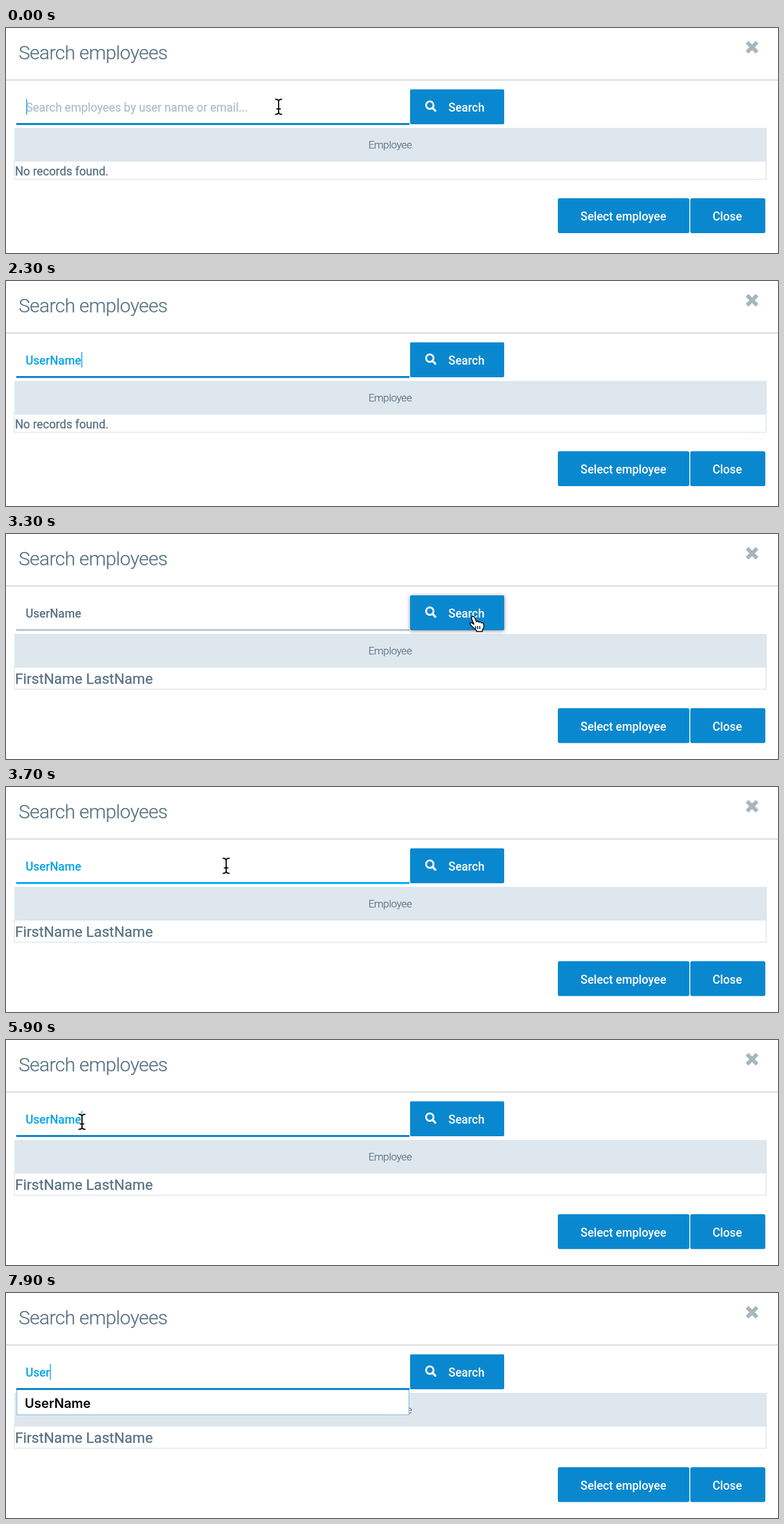
Recreate the animation shown at these times as an HTML page. Size 1280 by 374 pixels, loop 8000 ms.

```html
<!DOCTYPE html>
<html lang="en">
<head>
<meta charset="utf-8">
<title>Search employees</title>
<style>
  html, body { margin: 0; width: 100%; height: 100%; overflow: hidden; background: #fff; }
  svg { display: block; width: 1280px; height: 374px; font: 19.4px Roboto, sans-serif; }
  text { white-space: pre; }
  .thin { font-weight: 300; letter-spacing: -.02em; fill: #5a7384; stroke: #5a7384; stroke-width: .3; }
  .firm { stroke-width: .35; }
  .button { fill: #0a88cf; }
  .label { fill: #fff; font-weight: 500; font-size: 19.3px; }
  .hover { filter: drop-shadow(0 1px 3px rgba(0, 0, 0, .45)); }
</style>
</head>
<body>
<svg viewBox="0 0 1280 374">
  <text class="thin" x="21" y="52" font-size="32">Search employees</text>
  <path d="M1231 26l12 12m0-12l-12 12" stroke="#a8b5bd" stroke-width="6.4" stroke-linecap="square"/>
  <rect y="85" width="1280" height="3" fill="#e2e3e4"/>

  <rect x="14" y="166" width="1247" height="56" fill="#dfe7ee"/>
  <path d="M1260.5 166v56" stroke="#cfdce6"/>
  <text class="thin" x="601" y="200" font-size="17.4">Employee</text>
  <rect id="row" x="13.75" y="221" width="1246.5" fill="none" stroke="#dde6ed" stroke-width="1.5"/>
  <text id="result" class="firm" x="15" fill="#5a7384" stroke="#5a7384"></text>

  <g id="searchButton">
    <rect class="button" x="670" y="102" width="156" height="58" rx="2"/>
    <g fill="none" stroke="#fff" stroke-width="3">
      <circle cx="702.7" cy="128.3" r="6.2"/>
      <path d="M707.2 132.8l4.6 4.6" stroke-width="3.6" stroke-linecap="round"/>
    </g>
    <text class="label" x="733.5" y="139">Search</text>
  </g>

  <g id="footer">
    <rect class="button" x="915" y="283" width="218" height="58" rx="3"/>
    <rect class="button" x="1134.5" y="283" width="124.5" height="58" rx="3"/>
    <text class="label" x="952.5" y="320">Select employee</text>
    <text class="label" x="1171.5" y="320">Close</text>
  </g>

  <text id="hint" class="firm" x="33" y="139" fill="#b3bfc7" stroke="#b3bfc7">Search employees by user name or email...</text>
  <rect id="selection" y="118" height="26" fill="#b2d7fd"/>
  <text id="value" x="32.4" y="139" font-size="19.6" font-weight="500"></text>
  <rect id="caret" y="118" width="1.6" height="26" fill="#16a6ef"/>

  <g id="dropdown">
    <rect x="18" y="160" width="650" height="42.5" fill="#fff" stroke="#8dbdec" stroke-width="1.3"/>
    <text x="31" y="191" font-family="Inter, sans-serif" font-size="21.4" font-weight="600">UserName</text>
  </g>
  <rect id="underline" x="17" y="158" width="652" height="3.2"/>

  <g id="spinner" fill="#90b7cb"></g>

  <g id="beam" fill="none" stroke-linecap="round">
    <path id="beamShape" d="M-5 -12.5q5 0 5 4V8.5q0 4 -5 4M5 -12.5q-5 0 -5 4M0 8.5q0 4 5 4M-3 3.5h6" stroke="#fff" stroke-width="4"/>
    <use href="#beamShape"/>
    <path d="M-5 -12.5q5 0 5 4V8.5q0 4 -5 4M5 -12.5q-5 0 -5 4M0 8.5q0 4 5 4M-3 3.5h6" stroke="#000" stroke-width="1.9"/>
  </g>
  <g id="hand" stroke="#000" stroke-width="1.5" stroke-linejoin="round">
    <path fill="#fff" d="M-5 -11c2-2 4-1 5 1l3 7c1-2 4-1 4 1c1-2 4-1 4 1c2-1 4 0 4 2c1 4 0 7-2 9v3h-10v-2c-4-2-6-6-10-9c-2-3 1-5 4-2l2 1l-4-9z"/>
    <path fill="none" d="M5 4v5M8.5 4v5M1.5 4v5"/>
  </g>
</svg>
<script>
const STEP = 200, LOOP = 8000;
const $ = id => document.getElementById(id);
const show = (id, on) => $(id).setAttribute('visibility', on ? 'visible' : 'hidden');
const set = (id, attrs) => { for (const name in attrs) $(id).setAttribute(name, attrs[name]); };
const within = (n, from, to) => n >= from && n < to;

// Pointer stops: [step, x, y]; each list is one stretch of visibility.
const pointerRuns = [
  [[0, 452, 131], [1, 452, 131]],
  [[13, 752, 142], [14, 777, 149], [17, 777, 149], [18, 560, 136], [19, 365, 131],
   [22, 205, 136], [29, 205, 136], [30, 126, 136], [31, 80, 136], [32, 5, 136]]
];

const dots = Array.from({ length: 8 }, (_, i) => {
  const dot = document.createElementNS('http://www.w3.org/2000/svg', 'circle');
  const angle = i * Math.PI / 4;
  dot.setAttribute('cx', 638 + 35.3 * Math.cos(angle));
  dot.setAttribute('cy', 187.3 + 35.3 * Math.sin(angle));
  return $('spinner').appendChild(dot);
});

function pointerAt(step) {
  const run = pointerRuns.find(r => within(step, r[0][0], r[r.length - 1][0] + 1));
  if (!run) return null;
  const i = run.findIndex(stop => stop[0] >= step);
  const b = run[i], a = run[Math.max(0, i - 1)];
  const f = b[0] > a[0] ? (step - a[0]) / (b[0] - a[0]) : 1;
  return { x: a[1] + (b[1] - a[1]) * f, y: a[2] + (b[2] - a[2]) * f };
}

function typedLength(step) {
  if (step >= 36) return Math.min(4, step - 35);
  return step < 7 ? Math.max(0, Math.min(4, step - 1)) : Math.min(8, step - 2);
}

function draw() {
  const step = Math.floor((performance.now() % LOOP + STEP / 2) / STEP);
  const pointer = pointerAt(step);
  const overButton = !!pointer && pointer.x > 670;
  const overField = !!pointer && !overButton;
  const focused = step < 14 || step >= 22;
  const found = step >= 17;
  const selecting = within(step, 31, 36);
  const value = $('value'), text = 'UserName'.slice(0, typedLength(step));

  value.textContent = text;
  set('value', { fill: focused || overField ? '#05a3ec' : '#5a7384' });
  set('underline', { fill: focused ? '#0782c6' : overField ? '#03a9f4' : '#b5c7d1' });
  show('hint', !text);

  const textEnd = 33 + value.getComputedTextLength();
  const selectionStart = step === 31 ? 33 + value.getSubStringLength(0, 4) : 33;
  set('selection', { x: selectionStart, width: Math.max(0, textEnd - selectionStart - .5) });
  show('selection', selecting);
  set('caret', { x: text ? textEnd - .6 : 33.5 });
  show('caret', focused && !selecting && !within(step, 25, 28));

  set('row', { height: found ? 37 : 30.5 });
  $('result').textContent = found ? 'FirstName LastName' : 'No records found.';
  set('result', { y: found ? 249 : 244.5, 'font-size': found ? 24.1 : 19.4 });
  set('footer', { transform: `translate(0 ${found ? 6.5 : 0})` });
  show('dropdown', step >= 33);
  $('searchButton').classList.toggle('hover', overButton);

  show('spinner', within(step, 15, 17));
  const head = (step - 15) * 8 * STEP / 1000;
  dots.forEach((dot, i) => {
    const lag = ((head - i) % 8 + 8) % 8;
    dot.setAttribute('r', 6.3 + Math.max(0, 4.8 - 1.6 * lag));
  });

  show('beam', overField);
  show('hand', overButton);
  if (pointer) set(overButton ? 'hand' : 'beam', { transform: `translate(${pointer.x} ${pointer.y})` });
  requestAnimationFrame(draw);
}
draw();
</script>
</body>
</html>
```
